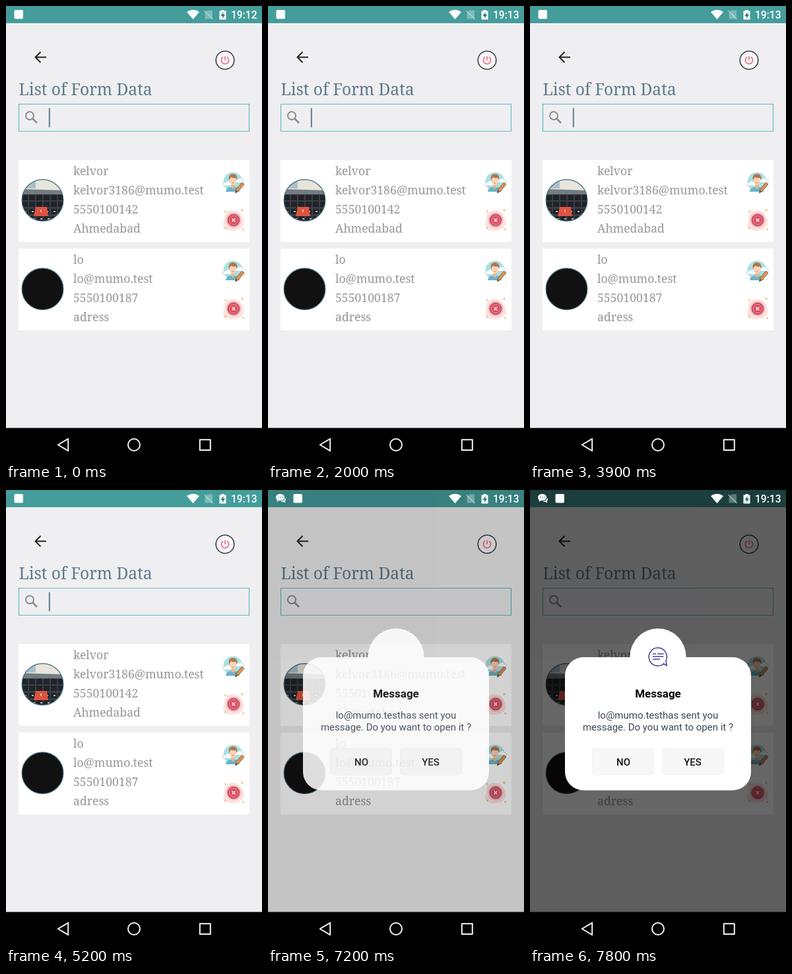
Animation, 388 px wide and 690 px high, one loop 8000 ms. Source, as an HTML page:

```html
<!DOCTYPE html>
<html lang="en">
<head>
<meta charset="utf-8">
<title>List of Form Data</title>
<style>
  html, body { margin: 0; height: 100%; overflow: hidden; background: #000; }
  svg { display: block; width: 100vw; height: 100vh; }
  .ui { font-family: Roboto, sans-serif; }
  .serif { font-family: "Noto Serif", serif; font-weight: 300; }
  .title { font-size: 24.6px; fill: #5d7a8b; }
  .row { font-size: 17.6px; fill: #96969a; }
  .mid { text-anchor: middle; }
  .line { fill: none; stroke-width: 2; }

  .step { animation: 8s step-end infinite; }
  .early { animation-name: early; }
  .late { animation-name: late; }
  .alert { animation-name: alert; }
  .shift { animation-name: shift; }
  .focus { animation-name: focus; }
  .scrim { animation-name: scrim; }
  .dialog { animation-name: dialog; }
  .caret { animation: blink 1s step-end infinite; }
  .pen { stroke-dasharray: 1 1; animation: draw 8s linear infinite; }

  @keyframes blink { 0% { opacity: 1 } 40% { opacity: 0 } 90%, 100% { opacity: 1 } }
  @keyframes focus { 0% { opacity: 1 } 80%, 100% { opacity: 0 } }
  @keyframes early { 0% { opacity: 1 } 11.25%, 100% { opacity: 0 } }
  @keyframes late { 0% { opacity: 0 } 11.25%, 100% { opacity: 1 } }
  @keyframes alert { 0% { opacity: 0 } 85%, 100% { opacity: 1 } }
  @keyframes shift { 0% { transform: none } 85%, 100% { transform: translateX(26px) } }
  @keyframes scrim {
    0% { opacity: 0 } 90% { opacity: .18 } 91.25% { opacity: .36 }
    92.5% { opacity: .5 } 93.75%, 100% { opacity: .6 }
  }
  @keyframes dialog {
    0% { opacity: 0 } 90% { opacity: .87 } 91.25% { opacity: .96 } 92.5%, 100% { opacity: 1 }
  }
  @keyframes draw {
    0%, 92.4% { stroke-dashoffset: 1; opacity: 0 }
    92.5% { stroke-dashoffset: 1; opacity: 1 }
    97.4%, 100% { stroke-dashoffset: 0; opacity: 1 }
  }
</style>
</head>
<body>
<svg viewBox="0 0 388 690" preserveAspectRatio="none">
  <defs>
    <clipPath id="round"><circle cx="55.5" cy="294" r="31.5"/></clipPath>

    <g id="edit">
      <circle cx="344" cy="266" r="14.5" fill="#a9e1e3"/>
      <path d="M329 272q-1-6 4-5 3-5 7 0 4 0 3 5zM348 267q-1-5 4-5 4-4 6 1 4 0 3 5z" fill="#fff" stroke="#9fced4" stroke-width=".7"/>
      <path d="M333 281q1-7 8-7h6q6 0 7 7z" fill="#69b3c6"/>
      <path d="M341.500 269h5v6l-2.500 2-2.500-2z" fill="#eeb48f"/>
      <ellipse cx="344" cy="264" rx="5" ry="7" fill="#fbd3b5"/>
      <path d="M338 264q-2-10 6-10 8 0 6 10l-1.500-4q-5 1-7-1-2 1-3.500 5z" fill="#b3744f"/>
      <path d="M342.500 267.500q1.500 1.500 3 0" fill="none" stroke="#a5633f" stroke-width=".7"/>
      <path d="M347.500 283l1.500-6 8.500-10 3.500 3-8.500 10z" fill="#dd9250" stroke="#7a5546" stroke-width=".8"/>
      <path d="M347.500 283l1-4 2.500 2z" fill="#59443e"/>
    </g>

    <g id="delete">
      <path d="M331 324q-1-15 13-15 8 0 13 8 5 6 3 14-4 9-16 9-14 0-15-8 0-4 2-8z" fill="#fce3e1"/>
      <circle cx="345" cy="324" r="11.500" fill="#f8bdbf"/>
      <circle cx="345" cy="324" r="9" fill="#e04a60" stroke="#8a5560" stroke-width=".8"/>
      <circle cx="345" cy="324" r="6.500" fill="none" stroke="#f0919b"/>
      <path d="M342.600 321.600l4.800 4.800m0-4.800l-4.800 4.800" stroke="#fff" stroke-width="1.400"/>
      <path d="M356 309h4m-2-2v4M331 311h3m-1.500-1.500v3M331 336h3m-1.500-1.500v3M358 338h3m-1.500-1.500v3" stroke="#f2b45f"/>
    </g>

    <g id="card">
      <path d="M19 233h350v124H19z" fill="#fff"/>
      <use href="#edit"/>
      <use href="#delete"/>
    </g>
  </defs>

  <path d="M0 0h388v640H0z" fill="#efeef0"/>
  <path d="M0 0h388v26H0z" fill="#449d9b"/>

  <!-- header -->
  <path d="M61 77.500H45m7.500-8l-8 8 8 8" class="line" stroke="#23252f"/>
  <circle cx="332" cy="82" r="13.800" fill="#f8f6f8" stroke="#3a404c" stroke-width="1.600"/>
  <path d="M329 77.300a5.600 5.600 0 1 0 6 0M332 76v6" fill="none" stroke="#ee6a81" stroke-width="1.600"/>
  <text x="19.500" y="135" class="serif title">List of Form Data</text>

  <!-- search -->
  <path d="M19.500 148.500h349v41h-349z" fill="#efeef1" stroke="#62bcbf" stroke-width="1.200"/>
  <g class="line" stroke="#8d8c95">
    <circle cx="36" cy="166" r="6"/>
    <path d="M40.500 170.500l6.500 6.500" stroke-width="2.600"/>
  </g>
  <g class="step focus"><path class="caret" d="M64.800 154.500h2v29h-2z" fill="#5b7e8f"/></g>

  <!-- cards -->
  <use href="#card"/>
  <g clip-path="url(#round)">
    <path d="M23 262h65v65H23z" fill="#3b3e44"/>
    <path d="M23 262h65v17H23z" fill="#e8e5dc"/>
    <path d="M23 262h22v14H23z" fill="#a9bfca"/>
    <path d="M23 277l65 2v6H23z" fill="#727d83"/>
    <path d="M24 290h64M24 300h64M24 311h64M24 322h64" stroke="#202328" stroke-width="8" stroke-dasharray="9 2"/>
    <path d="M28 311h58M30 322h54" stroke="#aeb4b6" stroke-width="2" stroke-dasharray="3 8"/>
    <path d="M45 304h17l2 14H42z" fill="#dc5341"/>
    <path d="M53 308v4" stroke="#f8c8b8" stroke-width="1.500"/>
  </g>
  <circle cx="55.500" cy="294" r="31.400" fill="none" stroke="#46707c" stroke-width="1.200"/>
  <g class="serif row">
    <text x="102" y="256">kelvor</text>
    <text x="102" y="285">kelvor3186@mumo.test</text>
    <text x="102" y="314">5550100142</text>
    <text x="102" y="343">Ahmedabad</text>
  </g>

  <use href="#card" y="134"/>
  <circle cx="55.500" cy="428.200" r="31.400" fill="#111" stroke="#46707c" stroke-width="1.200"/>
  <g class="serif row">
    <text x="102" y="390">lo</text>
    <text x="102" y="419">lo@mumo.test</text>
    <text x="102" y="448">5550100187</text>
    <text x="102" y="477">adress</text>
  </g>

  <path class="step scrim" d="M0 0h388v640H0z"/>

  <!-- status icons stay bright above the scrim -->
  <g fill="#fff" class="ui" font-size="15.6" font-weight="500">
    <g class="step alert">
      <path d="M18.500 6c4 0 6.500 2.200 6.500 5s-2.500 5-6.500 5l-2 0-3 2 .5-3c-1.300-1-2-2.500-2-4 0-2.800 2.500-5 6.500-5z"/>
      <path d="M26 11.500c1.500 2 1.200 4.200-.3 5.500l.6 2.500-3-1.500c-1.800.2-3.300-.2-4.300-1 4 0 6.500-2.200 7-5.500z"/>
      <path d="M15 11h1.600m1.700 0h1.600m1.700 0h1.600" stroke="#449d9b" stroke-width="1.600"/>
    </g>
    <rect class="step shift" x="12.500" y="6" width="13.500" height="13.500" rx="2"/>
    <path d="M283.500 20.300L274 9q9.500-6.500 19 0z"/>
    <path d="M305.500 6.500h7.500v13h-11.500v-9z" opacity=".3"/>
    <path d="M300.500 7l13 13" stroke="#cfe5e4" stroke-width="1.300" opacity=".7"/>
    <path d="M326.500 6h4v1.500h3v13h-10v-13h3z"/>
    <path d="M329.500 9l-4 6h2.600v4l4-6h-2.600z" fill="#2f7775"/>
    <text class="step early" x="341" y="19">19:12</text>
    <text class="step late" x="341" y="19">19:13</text>
  </g>

  <!-- message dialog -->
  <g class="step dialog ui">
    <rect x="53" y="253" width="282" height="201.500" rx="28" fill="#fff"/>
    <circle cx="194" cy="252" r="42.500" fill="#fff"/>
    <g fill="none" stroke="#4a3d99" stroke-width="1.500">
      <path class="pen" pathLength="1" d="M203.500 262a13.600 13.600 0 1 1 2.500-3.500l1.300 7-5.500-2.200"/>
      <path class="pen" pathLength="1" d="M186 248h5"/>
      <path class="pen" pathLength="1" d="M193 248h9.500"/>
      <path class="pen" pathLength="1" d="M186 252h16.500"/>
      <path class="pen" pathLength="1" d="M186 256h11"/>
    </g>
    <g class="mid">
      <text x="194" y="314" font-size="17" font-weight="700" fill="#050505">Message</text>
      <g font-size="15" fill="#3c4652">
        <text x="194" y="346">lo@mumo.testhas sent you</text>
        <text x="194" y="363.500">message. Do you want to open it ?</text>
      </g>
      <g fill="#f8f7f8" stroke="#f3f2f3">
        <rect x="94.500" y="391" width="93" height="40" rx="5"/>
        <rect x="200.500" y="391" width="93" height="40" rx="5"/>
      </g>
      <g font-size="15" font-weight="500" fill="#141414">
        <text x="141.500" y="417">NO</text>
        <text x="246.500" y="417">YES</text>
      </g>
    </g>
  </g>

  <!-- navigation bar -->
  <path d="M0 638.500h388v51.500H0z"/>
  <g class="line" stroke="#f2f2f2" stroke-linejoin="round">
    <path d="M78.800 664L94.200 654.800v18.400z"/>
    <circle cx="194" cy="664" r="9"/>
    <path d="M293.800 656.300h16v15.700h-16z"/>
  </g>
</svg>
</body>
</html>
```
